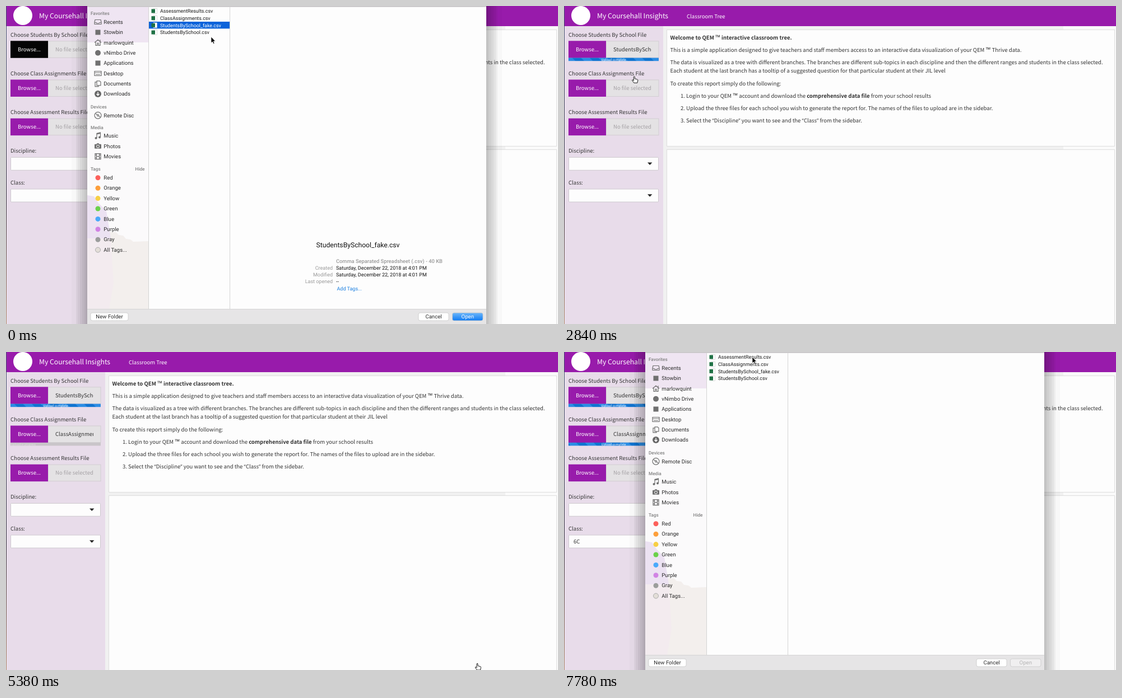
Animation, 985 px wide and 568 px high, one loop 8000 ms. Source, as an HTML page:

```html
<!DOCTYPE html>
<html lang="en">
<head>
<meta charset="utf-8">
<title>Classroom tree upload</title>
<style>
html, body { margin: 0; width: 100%; height: 100%; overflow: hidden; }
svg { display: block; width: 100vw; height: 100vh; }
text { white-space: pre; text-rendering: geometricPrecision; }
.page { font: 9.56px "Noto Sans CJK JP", "Noto Sans CJK SC", "Source Sans Pro", sans-serif; fill: #333; }
.page .b { font-weight: 700; }
.page .q { font-family: "Open Sans", sans-serif; }
.page .tm { font: 11.5px "Open Sans", sans-serif; }
.dlg { font: 9.6px Roboto, Arial, sans-serif; fill: #2b2b2b; }
.dlg .head { font-size: 8.2px; font-weight: 500; fill: #808080; }
.dlg .file { font-size: 8.9px; fill: #1a1a1a; }
.dlg .meta { font-size: 9px; fill: #111; }
.dlg .dim { font-size: 9px; fill: #999; }
.ico { fill: none; stroke: #707070; stroke-width: 1.2; }
</style>
</head>
<body>
<svg id="stage" viewBox="0 0 985 568"></svg>
<script>
const TICK = 149.2, LOOP = 8000;
const $ = id => document.getElementById(id);
const rect = (x, y, w, h, fill, more = '') =>
  `<rect x="${x}" y="${y}" width="${w}" height="${h}" fill="${fill}" ${more}/>`;
const text = (x, y, str, cls = '', more = '') =>
  `<text x="${x}" y="${y + 3.4}" class="${cls}" ${more}>${str}</text>`;
const mid = 'text-anchor="middle"', end = 'text-anchor="end"';
const line = d => `<path d="${d}" stroke="#d4d4d4" fill="none"/>`;

// Web page
const rich = str => str
  .replace(/™/g, '<tspan class="tm">™</tspan>')
  .replace(/[“”]/g, '<tspan class="q">$&</tspan>')
  .replace(/\*(.+?)\*/g, '<tspan class="b">$1</tspan>');

const inputs = ['Students By School', 'Class Assignments', 'Assessment Results'];
const fileInput = (name, i) => {
  const y = 62.3 + i * 69.2;
  return text(8, y - 11, `Choose ${name} File`) +
    rect(75, y + .5, 94, 29.5, '#e4e2e4', 'stroke="#d2ced2"') +
    rect(8, y, 67, 30.5, '#981bab', `id="browse${i}"`) +
    text(41.5, y + 15.2, 'Browse...', '', `${mid} style="fill:#fff"`) +
    `<g clip-path="url(#nameClip)">${text(88, y + 15.2, 'No file selected', '', `id="name${i}"`)}</g>` +
    `<g id="bar${i}">${rect(8, y + 30.3, 161, 5.6, '#c9c5c9')}
      ${text(9, y + 32.5, 'Upload in progress', '', 'style="fill:#e9e6e9;font-size:5px"')}</g>
    <g id="done${i}">${rect(8, y + 30.3, 161, 5.6, 'url(#stripes)')}
      ${text(88.5, y + 31.8, 'Upload complete', '', `${mid} style="fill:#fff;font-size:5.5px"`)}</g>`;
};
const select = (label, y) => text(8, y - 11, label) +
  rect(8.5, y + .3, 160, 23, '#fdfdfd', 'stroke="#cdc8ce" rx="1"') +
  `<path d="M149 ${y + 9.6}h8.4l-4.2 4.4z" fill="#222"/>`;

const copy = [
  [189.5, 57, '*Welcome to QEM ™ interactive classroom tree.*'],
  [189.5, 79, 'This is a simple application designed to give teachers and staff members access to an interactive data visualization of your QEM ™ Thrive data.'],
  [189.5, 101, 'The data is visualized as a tree with different branches. The branches are different sub-topics in each discipline and then the different ranges and students in the class selected.'],
  [189.5, 116, 'Each student at the last branch has a tooltip of a suggested question for that particular student at their JIL level'],
  [189.5, 138.7, 'To create this report simply do the following:'],
  [208, 160.5, '1. Login to your QEM ™ account and download the *comprehensive data file* from your school results'],
  [208, 183, '2. Upload the three files for each school you wish to generate the report for. The names of the files to upload are in the sidebar.'],
  [208, 205, '3. Select the “Discipline” you want to see and the “Class” from the sidebar.']
];
const page = `<g class="page">
  ${rect(0, 0, 985, 568, '#f1f1f1')}${rect(891, 36, 94, 532, '#fafafa')}
  ${rect(0, 36, 177, 532, '#e8dcea')}${rect(0, 0, 985, 36, '#981bab')}
  <circle cx="30" cy="17" r="17" fill="#fff"/>
  ${text(59, 18.7, 'My Coursehall Insights', '', 'style="fill:#fff;font-size:12.2px"')}
  ${text(219, 18.5, 'Classroom Tree', '', 'style="fill:#fff"')}
  ${rect(183.5, 42.5, 799, 208, '#fdfdfd', 'stroke="#dedede"')}
  ${rect(183.5, 256.5, 799, 330, '#fdfdfd', 'stroke="#dedede"')}
  ${copy.map(([x, y, s]) => text(x, y, rich(s))).join('')}
  ${inputs.map(fileInput).join('')}
  ${select('Discipline:', 270)}${select('Class:', 326.7)}
  ${text(17, 338.5, '6C', '', 'id="klass"')}
  ${rect(0, 0, 1, 568, 'url(#edge)')}</g>`;

// File dialog
const icons = {
  tray: 'M159 -4h10l1 4v4h-12v-4zM158 1h3l1 1.5h4l1 -1.5h3',
  home: 'M158 0l6-5 6 5M160 -1v6h3v-4h2v4h3v-6M168 -5v3',
  desk: 'M158 -4h12v8h-12zM158 -1.5h12M160 2h8',
  docs: 'M162 -5h5l2 2v6h-7zM162 -3h-3v8h6v-2',
  disc: 'M158 0a6 6 0 1 0 12 0a6 6 0 1 0-12 0M162.5 0a1.5 1.5 0 1 0 3 0a1.5 1.5 0 1 0-3 0M160-3l2.5 2M165.5 1l2.5 2',
  film: 'M159 -5h10v10h-10zM161.5-5v10M166.5-5v10M161.5 0h5M159-2.5h2M159 2.5h2M167-2.5h2M167 2.5h2'
};
const glyph = {
  box: rect(159.5, -4.5, 9, 9, '#707070'),
  dot: '<circle cx="164" r="5" fill="#707070"/>',
  down: '<circle cx="164" r="6" fill="#686868"/><path d="M164-3.5v6M161.5 0l2.5 2.8 2.5-2.8" stroke="#fff" stroke-width="1.4" fill="none"/>',
  note: '<path d="M162 4v-8.5l6.5-1.5v8" class="ico"/><path d="M162-4.5l6.5-1.5v2l-6.5 1.5z" fill="#707070"/><circle cx="160.5" cy="4" r="2" fill="#707070"/><circle cx="167" cy="2.5" r="2" fill="#707070"/>',
  cam: rect(158, -3.5, 12, 8, '#707070', 'rx="1"') + rect(162, -5, 4, 3, '#707070') +
    '<circle cx="164" cy=".5" r="2.5" fill="#707070" stroke="#fff"/>'
};
const places = [
  ['tray', 28.5, 'Recents'], ['box', 47, 'Stowbin'], ['home', 65.3, 'marlowquint'],
  ['dot', 83.7, 'vNimbo Drive'], ['box', 102, 'Applications'], ['desk', 120.5, 'Desktop'],
  ['docs', 138.8, 'Documents'], ['down', 157, 'Downloads'], ['disc', 195.3, 'Remote Disc'],
  ['note', 232, 'Music'], ['cam', 250.3, 'Photos'], ['film', 268.6, 'Movies']
];
const place = ([icon, y, label]) => `<g transform="translate(0 ${y})">
  ${glyph[icon] || `<path d="${icons[icon]}" class="ico"/>`}</g>` + text(174.3, y - .2, label);

const tags = { Red: '#fc605b', Orange: '#fd9f3c', Yellow: '#f7cf46', Green: '#6bd14b',
  Blue: '#4aa9fb', Purple: '#d183e4', Gray: '#9b9d9c', 'All Tags...': '#e3ded8' };
const tag = ([label, fill], i) => {
  const y = 306.8 + i * 18.4;
  const more = i == 7 ? 'stroke="#aaa"' : '';
  return `<circle cx="164" cy="${y}" r="4.5" fill="${fill}" ${more}/>` + text(174.3, y - .2, label);
};
const files = ['AssessmentResults', 'ClassAssignments', 'StudentsBySchool_fake', 'StudentsBySchool'];
const rowY = i => 9 + i * 12.7;
const fileRow = (name, i) => rect(263, rowY(i) - 4.5, 6.5, 9, '#fff', 'stroke="#c8c8c8" stroke-width=".6"') +
  rect(259.5, rowY(i) - 3.5, 6.5, 7, '#1f7145') +
  text(275, rowY(i) - .1, name + '.csv', 'file', `id="file${i}"`);
const button = (x, w, label, id) => rect(x, 548, w, 14, '#fff', `rx="3" stroke="#c9c9c9" stroke-width=".8" id="${id}"`) +
  text(x + w / 2, 554.7, label, '', `${mid} id="${id}Label"`);

const rows = [...Array(52)].map((_, i) => {
  const y = 134 + i * 2.95, right = y < 165 ? 644 : 689;
  return `M571 ${y}H${right}`;
}).join('');
const csvIcon = `<g id="csv">
  <path d="M562 125H622Q645 125 654 138L681 163Q693 174 693 190V296H562Z" fill="#bbb" opacity=".6"/>
  <path d="M562.5 125H622Q647 125 648 165Q693 163 693 190V294H562.5Z" fill="#fcfcfc" stroke="#cfcfcf"/>
  <path d="${rows}" stroke="#a2a2a2" stroke-dasharray="35 .8 13 4 9 4 5 3 8 6 15 4 14 9" fill="none"/>
  <path d="M622 125Q647 126 648 165Q686 160 693 188Q693 175 681 163L654 138Q643 125 622 125Z" fill="url(#curl)" stroke="#c4c4c4" stroke-width=".7"/>
  ${text(628, 280, 'CSV', '', `${mid} style="font-size:20px;fill:#666"`)}</g>`;
const preview = `<g id="preview">${csvIcon}
  ${text(628, 428, '', '', `${mid} id="title" style="font-size:12.15px;fill:#111"`)}
  ${text(589, 456, 'Comma Separated Spreadsheet (.csv) - 40 KB', 'dim', 'style="font-size:9.3px;font-weight:500"')}
  ${['Created', 'Modified', 'Last opened'].map((s, i) => text(583, 468 + i * 12, s, 'dim', end) +
    text(589, 468 + i * 12, i < 2 ? 'Saturday, December 22, 2018 at 4:01 PM' : '--', 'meta')).join('')}
  ${text(590.5, 505, 'Add Tags...', 'meta', 'style="fill:#1a7fe0"')}</g>`;

const shadow = [28, 20, 17, 13, 9, 5, 2].map((d, i) =>
  rect(145 - d, -14 - d, 712 + 2 * d, 591 + 2 * d, '#000', `opacity="${i ? .045 : .02}" rx="${d}"`)).join('');
const toolbar = rect(145, -22, 712, 24, '#e6e4e6', 'rx="5"') +
  rect(158, -16, 16, 10, '#f8f8f8', 'stroke="#ccc"') +
  [228, 248, 268, 298, 710, 746].map(x => rect(x, -16, 18, 10, x == 268 ? '#888' : '#f8f8f8', 'stroke="#ccc"')).join('') +
  rect(430, -17, 142, 11, '#fff', 'stroke="#ccc" rx="3"') + text(501, -12, 'OVK Elementary', '', mid) +
  rect(772, -17, 80, 11, '#fff', 'stroke="#ccc" rx="3"') + text(812, -12, 'Search', 'dim', mid) +
  rect(145, 0, 712, 1.5, '#c4c2c4');
const dialog = `<g id="dialog" class="dlg">${shadow}
  ${rect(145, -22, 712, 591, '#fdfdfd', 'rx="5"')}
  ${rect(145, 1, 110, 540, '#fbfafb')}${rect(145, 1, 110, 64, '#efe5f2')}
  <path d="M145 404H196l5 5 8 1 5 6 8 1 5 4 28-1V541H145Z" fill="#f3efed"/>
  <path d="M145 415H187L192 495 184 541H145Z" fill="#f3ebef"/>
  <path d="M145 338l12 2 8 12 14 14 5 30 3 19H145Z" fill="#ece2f2"/>
  ${toolbar}
  ${rect(145, 541, 712, 28, '#e6e5e6')}
  ${line('M254.5 1V541M399.5 1V541M145 541.5H857')}
  ${[[13, 'Favorites'], [180, 'Devices'], [217, 'Media'], [291, 'Tags']].map(([y, s]) => text(151, y - .3, s, 'head')).join('')}
  ${text(247.5, 290.5, 'Hide', 'head', end)}
  ${places.map(place).join('')}${Object.entries(tags).map(tag).join('')}
  ${rect(255, 0, 144, 12.4, '#0b63da', 'id="mark"')}
  ${files.map(fileRow).join('')}${preview}
  ${button(151, 67, 'New Folder', 'folder')}${button(736, 54, 'Cancel', 'cancel')}${button(796.5, 54.5, 'Open', 'open')}</g>`;

const pointer = `<g id="pointer">
  <path id="arrow" d="M0 0V11L2.5 8.8 4.2 12.6 6 11.8 4.3 8H7.6Z" fill="#000" stroke="#fff" stroke-width=".7"/>
  <path id="hand" d="M-1 1Q0-.8 1 1V4.6L5 5.6Q6.5 6 6.5 7.5L5.5 12H-.5L-3.5 8Q-4 6.3-2.5 6.6L-1 8Z" fill="#fff" stroke="#000" stroke-width=".9"/></g>`;

$('stage').innerHTML = `<defs>
  <clipPath id="nameClip">${rect(88, 0, 68, 568, '#000')}</clipPath>
  <pattern id="stripes" width="22" height="22" patternUnits="userSpaceOnUse" patternTransform="rotate(-45)">
    ${rect(0, 0, 22, 22, '#0f74d1')}${rect(0, 0, 11, 22, '#2b8de4')}</pattern>
  <linearGradient id="edge" x2="0" y2="1"><stop stop-color="#4a5a78"/><stop offset=".6" stop-color="#33303c"/><stop offset="1" stop-color="#b08a6a"/></linearGradient>
  <linearGradient id="curl" x1="0" y1="1" x2="1" y2="0"><stop stop-color="#fff"/><stop offset=".55" stop-color="#f3f3f3"/><stop offset="1" stop-color="#b5b5b5"/></linearGradient>
  <linearGradient id="blue" x2="0" y2="1"><stop stop-color="#6cb6fa"/><stop offset="1" stop-color="#0f7bf3"/></linearGradient>
  <linearGradient id="blueDown" x2="0" y2="1"><stop stop-color="#4a97ee"/><stop offset="1" stop-color="#0a5fd8"/></linearGradient>
</defs>${page}${dialog}${pointer}`;

// Pointer path: tick, x, y
const path = [
  [0, 366, 55], [1, 753, 546], [3, 790, 560], [5, 838, 557], [8, 842, 555], [9, 804, 528],
  [10, 560, 390], [11, 250, 220], [12, 90, 160], [13, 63, 158], [18, 63, 158], [21, 250, 60],
  [23, 329, 26], [24, 330, 20], [26, 331, 19], [27, 500, 220], [29, 800, 520], [30, 841, 555],
  [33, 841, 556], [36, 841, 556], [37, 700, 480], [39, 300, 300], [41, 70, 225], [42, 60, 222],
  [45, 60, 222], [47, 295, 114], [48, 351, 81], [50, 349, 76], [51, 342, 40], [52, 336, 9], [54, 336, 9]
];
const within = (k, a, b) => k >= a && k < b;
const show = (id, on) => $(id).setAttribute('display', on ? 'inline' : 'none');

function pointerAt(k) {
  const i = Math.max(1, path.findIndex(p => p[0] >= k));
  const [a, b] = [path[i - 1], path[i]], f = (k - a[0]) / (b[0] - a[0]);
  return [1, 2].map(j => a[j] + (b[j] - a[j]) * f);
}

function draw(k) {
  const fading = k == 20 || k == 47;
  show('dialog', k < 9 || within(k, 20, 35) || k >= 47);
  $('dialog').setAttribute('opacity', fading ? .55 : 1);
  $('dialog').setAttribute('transform', `translate(501 273) scale(${fading ? .4385 : 1}) translate(-501 -273)`);

  const chosen = k < 9 ? 2 : within(k, 26, 35) ? 1 : -1;
  const opening = k == 8 || k == 34;
  show('mark', chosen >= 0);
  $('mark').setAttribute('y', rowY(chosen) - 6.4);
  files.forEach((_, i) => $('file' + i).style.fill = i == chosen ? '#fff' : '');
  $('title').textContent = chosen < 0 ? '' : files[chosen] + '.csv';
  show('preview', k < 9 || within(k, 27, 35));
  show('csv', within(k, 1, 9) || within(k, 28, 35));
  $('open').setAttribute('fill', chosen < 0 ? '#f0eff0' : opening ? 'url(#blueDown)' : 'url(#blue)');
  $('openLabel').style.fill = chosen < 0 ? '#b4b4b4' : '#fff';

  const uploads = [[9, 12, files[2]], [35, 39, files[1]], [99, 99, '']];
  const pressed = [k < 9, k == 18, k == 44];
  uploads.forEach(([start, done, file], i) => {
    const named = k >= start;
    $('name' + i).textContent = named ? file + '.csv' : 'No file selected';
    $('name' + i).style.fill = named ? '' : '#a5a1a5';
    show('bar' + i, within(k, start, done));
    show('done' + i, k >= done);
    $('browse' + i).setAttribute('fill', pressed[i] ? '#050505' : '#981bab');
  });
  show('klass', k >= 41);

  const hand = [[6, 9], [12, 20], [31, 37], [41, 46]].some(([a, b]) => within(k, a, b));
  show('hand', hand);
  show('arrow', !hand);
  $('pointer').setAttribute('transform', `translate(${pointerAt(k)})`);
}

function frame() {
  draw(Math.min(52, Math.floor(performance.now() % LOOP / TICK)));
  requestAnimationFrame(frame);
}
frame();
</script>
</body>
</html>
```
